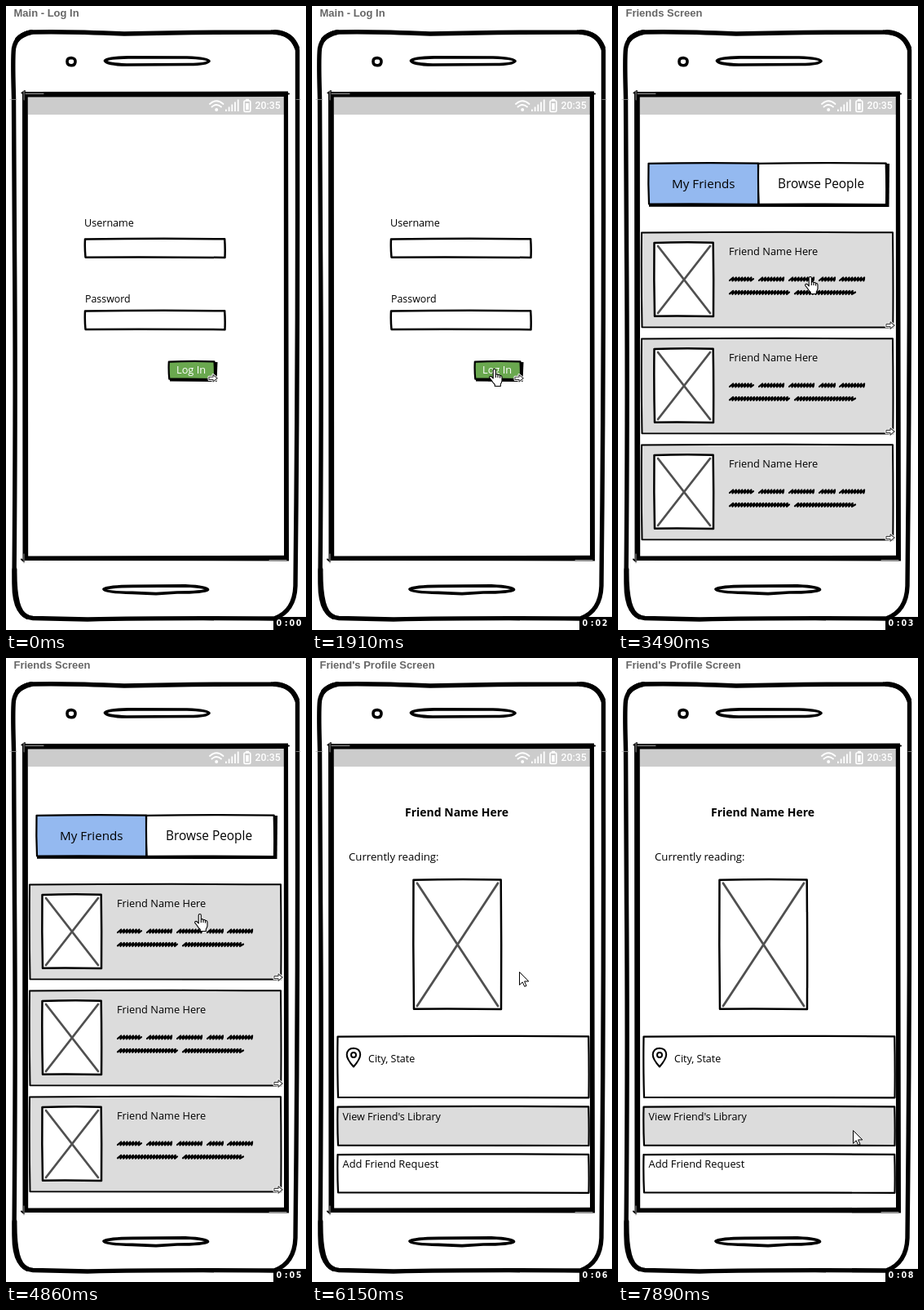
Write an HTML page that moves like this. It is 368 by 764 pixels and loops after 8000 ms.

```html
<!DOCTYPE html>
<html lang="en">
<head>
<meta charset="utf-8">
<title>Phone wireframe walkthrough</title>
<style>
  html, body { margin: 0; width: 100%; height: 100%; overflow: hidden; background: #fff; }
  svg { display: block; width: 368px; height: 764px; }
  text { font-family: "Open Sans", "Noto Sans", sans-serif; font-weight: 500; white-space: pre; }
  .title { font: bold 13px "Liberation Sans", Arial, sans-serif; fill: #666; }
  .clock { font: 500 12.3px Roboto, sans-serif; fill: #fff; }
  .timer { font: bold 9.6px "DejaVu Sans", sans-serif; fill: #fff; }
  .line { fill: none; stroke: #000; stroke-linecap: round; stroke-linejoin: round; }
</style>
</head>
<body>
<svg id="stage" viewBox="0 0 368 764" xmlns="http://www.w3.org/2000/svg"></svg>
<script>
const LOOP = 8000;
const GREY = '#dcdcdc';

const path = (d, fill, stroke = 'none', width = 1, extra = '') =>
  `<path d="${d}" fill="${fill}" stroke="${stroke}" stroke-width="${width}" stroke-linejoin="round" ${extra}/>`;
const line = (d, width, color = '#000') =>
  `<path class="line" d="${d}" style="stroke:${color}" stroke-width="${width}"/>`;
const label = (x, y, size, str, extra = '') =>
  `<text x="${x}" y="${y}" font-size="${size}" ${extra}>${str}</text>`;
const group = (id, body) => `<g id="${id}">${body}</g>`;

// Rectangle with slightly bowed, hand-drawn edges.
function box(x, y, w, h, fill = '#fff', width = 2.2) {
  const r = x + w, b = y + h, mx = x + w / 2, my = y + h / 2;
  return path(`M${x} ${y + .6}Q${mx} ${y - .7} ${r - .3} ${y + .3}Q${r + .5} ${my} ${r} ${b}` +
    `Q${mx} ${b - .8} ${x + .5} ${b - .3}Q${x - .6} ${my} ${x} ${y + .6}Z`, fill, '#000', width);
}

function picture(x, y, w, h) {
  const r = x + w - 4, b = y + h - 4;
  return box(x, y, w, h, '#fff', 2.5) +
    line(`M${x + 4.5} ${y + 4.5}L${r} ${b}M${r} ${y + 4.5}L${x + 4.5} ${b}`, 2.8, '#505050');
}

function scribble(x0, x1, y) {
  let d = `M${x0 + 1} ${y + 1.5}`;
  for (let x = x0 + 1; x < x1 - 5; x += 3.7) d += `L${x + 4.2} ${y - 2}L${x + 3.4} ${y + 2}`;
  return line(d + `L${x1 - 1} ${y - .3}`, 2.2);
}

function linkArrow(x, y) {
  const d = `M${x} ${y - 1.6}h5v-2.6l5.2 4.2l-5.2 4.2v-2.6h-5z`;
  return path(d, '#fff', '#fff', 3) + path(d, '#fff', '#444', 1.1);
}

function phone() {
  const bars = [0, 1, 2, 3, 4].map(i =>
    `<rect x="${269 + i * 3.7}" y="${126.5 - i * 3}" width="1.8" height="${2.5 + i * 3}" fill="#fff"/>`).join('');
  return line('M9.5 112C9 90 8 65 9.5 52Q13 34 32 32Q75 31 145 34Q230 32 325 32Q351 31 357.5 54' +
      'L357.5 180Q358 440 355 710Q354 741 329 750Q190 749 100 751L33 749.5Q10 747 10 708Q12 480 10.5 300Z', 5.4) +
    line('M330 32Q350 33 357 51M14 41Q19 35 31 32M10.5 690Q10 742 26 748', 6) +
    '<rect x="27" y="111" width="314" height="22" fill="#ccc"/>' +
    path('M20 105L346 104.5L347 679.5L20.5 679ZM26.8 111.5L27.2 673.5L341 672.8L340.8 111Z', '#000', 'none', 1,
      'fill-rule="evenodd"') +
    line('M19.5 106.5L23 104M343 107.5H347M19 677.5L22 680', 2) +
    line('M22 104V115M22 671V682M24 107.5H46M323 678.5H344', 1, '#999') +
    line('M5 114.5H13M356 114.5H361', .7, '#aaa') +
    line('M75 68Q75 63.5 80 63.5Q85.5 64 85 68.5Q84.5 73 80 72.8Q75 72.5 75 68Z', 3.6) +
    line('M121.5 67Q124 63.2 150 62.8L222 63Q248 64 249 67.5Q246 71.5 225 71.5L148 72Q124 71.5 121.5 67Z', 3.7) +
    line('M120 714Q126 710.5 155 710.3L220 709.8Q247 711 247.5 714.5Q243 718 210 718L184 719.7L155 718.3Q122 718 120 714Z', 3.7) +
    line('M250 120Q258 112.5 266.5 120M252.5 123.5Q258 118.5 264 123.5', 1.8, '#fff') +
    '<circle cx="258.2" cy="127" r="2" fill="#fff"/>' + bars +
    '<rect x="292" y="116" width="7.8" height="13.3" rx="1.4" fill="none" stroke="#fff" stroke-width="1.7"/>' +
    '<rect x="294" y="113.8" width="4" height="2" fill="#fff"/>' +
    '<rect x="294.2" y="119" width="3.5" height="8" fill="#fff"/>' +
    '<text class="clock" x="305.5" y="126">20:35</text>';
}

const logIn = () =>
  label(96, 270, 12.6, 'Username') + box(97, 285, 171.5, 23, '#fff', 2.5) +
  label(97, 363, 12.4, 'Password') + box(97, 373, 171.5, 23.2, '#fff', 2.5) +
  path('M202 436L259.5 436L258.5 460L201 459.5Z', '#000') +
  box(199.8, 435, 56, 22, '#6aa84f', 2.2) +
  label(209, 450.3, 12.8, 'Log In', 'fill="#fff"') + linkArrow(249, 455.8);

function card(y) {
  return box(29, y, 308.3, 116.5, GREY, 2) + picture(44.5, y + 12.5, 72.5, 90.5) +
    label(136, y + 28.2, 12.8, 'Friend Name Here') +
    [[136, 167], [172, 204], [209, 241], [246, 267], [271, 303]].map(([a, b]) => scribble(a, b, y + 57.5)).join('') +
    [[136, 211], [216, 292]].map(([a, b]) => scribble(a, b, y + 73.8)).join('') +
    linkArrow(329, y + 114);
}

const friends = () =>
  path('M40 194L333 193L332.5 246L38 245.8Z', '#000') +
  box(37.5, 192.3, 134.7, 50.5, '#94b9f0', 2.2) + box(172.2, 192.3, 156.8, 50.8, '#fff', 2.2) +
  label(66, 223, 15.2, 'My Friends') + label(196, 223, 15.4, 'Browse People') +
  [277, 407, 537].map(card).join('');

const profile = () =>
  label(114, 194, 14, 'Friend Name Here', 'style="font-weight:700"') +
  label(45, 248, 13.2, 'Currently reading:') + picture(124.5, 271.2, 107.5, 158.8) +
  box(31.5, 463, 308, 75.3) +
  line('M51 500.5Q42.5 491 42.7 485.5Q43.5 477.7 51 477.7Q58.8 477.9 59.2 485.5Q59.2 491 51 500.5Z', 2) +
  '<circle cx="51" cy="486" r="3" fill="none" stroke="#000" stroke-width="2"/>' +
  label(69, 495, 12.5, 'City, State') +
  box(31.5, 549, 308, 48, GREY) + label(37.5, 566.3, 12.6, "View Friend's Library") +
  box(31.5, 607.5, 308, 47.3) + label(37.5, 624.3, 12.9, 'Add Friend Request');

// Pointers are drawn with their hot spot at 0,0.
const hand = path('M-.8 12V2Q-.8 .5 .8 .5Q2.3 .5 2.3 2V7Q4.5 6 5 7.8Q7 6.8 7.6 8.6Q10 8 10 10.8V15' +
  'Q9.8 17 8.3 19V21.5H1.3V19.5Q-1.3 17 -3 14L-5.2 11.3Q-5.7 9.3 -3.8 9.3Q-2.2 10 -.8 12Z' +
  'M2.3 7V11M5 7.8V11M7.6 8.6V11.5', '#fff', '#000', 1.1);
const arrow = path('M.5 .5V16.3L4.2 12.8L6.8 18.3L9 17.3L6.6 11.9H11.8Z', '#fff', '#000', 1);

const stage = document.getElementById('stage');
stage.innerHTML = phone() + '<text class="title" x="9.5" y="13" id="title"></text>' +
  group('logIn', logIn()) + group('friends', friends()) + group('profile', profile()) +
  group('pointer', group('hand', hand) + group('arrow', arrow)) +
  '<rect x="328" y="748" width="40" height="16"/><text class="timer" x="331.5 341.8 347.6 355.8" y="759" id="timer"></text>';

const el = id => document.getElementById(id);
const show = (id, on) => el(id).setAttribute('display', on ? 'inline' : 'none');

const screens = [[0, 'logIn', 'Main - Log In'], [2160, 'friends', 'Friends Screen'], [5260, 'profile', "Friend's Profile Screen"]];
const ticks = [900, 1890, 2910, 3960, 4840, 5830, 6870, 7890];
// Start, end, number of steps, then the points passed.
const moves = [
  [400, 1170, 7, [340, 585], [255, 482], [223, 444]],
  [3190, 3640, 4, [223, 444], [226, 375], [240, 307]],
  [4390, 4540, 2, [240, 307], [237, 313]],
  [5830, 6150, 4, [237, 313], [254, 384]],
  [6280, 6870, 6, [254, 384], [289, 450]],
  [6990, 7890, 8, [289, 450], [296, 515], [288, 578]]
];

function along(points, p) {
  const s = p * (points.length - 1), i = Math.min(Math.floor(s), points.length - 2), f = s - i;
  return points[i].map((v, k) => v + (points[i + 1][k] - v) * f);
}

function pointerAt(t) {
  const move = moves.filter(m => t >= m[0]).pop();
  if (!move) return null;
  const [start, end, n, ...points] = move;
  const step = Math.min(n, Math.floor((t - start) / (end - start) * (n - 1) + 1e-6) + 1);
  const p = step / n;
  return along(points, p * (1.4 - .4 * p));
}

function draw(t) {
  const current = screens.filter(s => t >= s[0]).pop();
  screens.forEach(s => show(s[1], s === current));
  el('title').textContent = current[2];
  el('timer').textContent = '0:0' + ticks.filter(k => t >= k).length;
  const pos = pointerAt(t);
  show('pointer', pos);
  if (!pos) return;
  const [x, y] = pos.map(Math.round);
  const isHand = t < 5830 && y < 458;
  el('pointer').setAttribute('transform', `translate(${x} ${y})`);
  show('hand', isHand);
  show('arrow', !isHand);
}

const begin = performance.now();
function frame() {
  draw((performance.now() - begin) % LOOP);
  requestAnimationFrame(frame);
}
draw(0);
requestAnimationFrame(frame);
</script>
</body>
</html>
```
